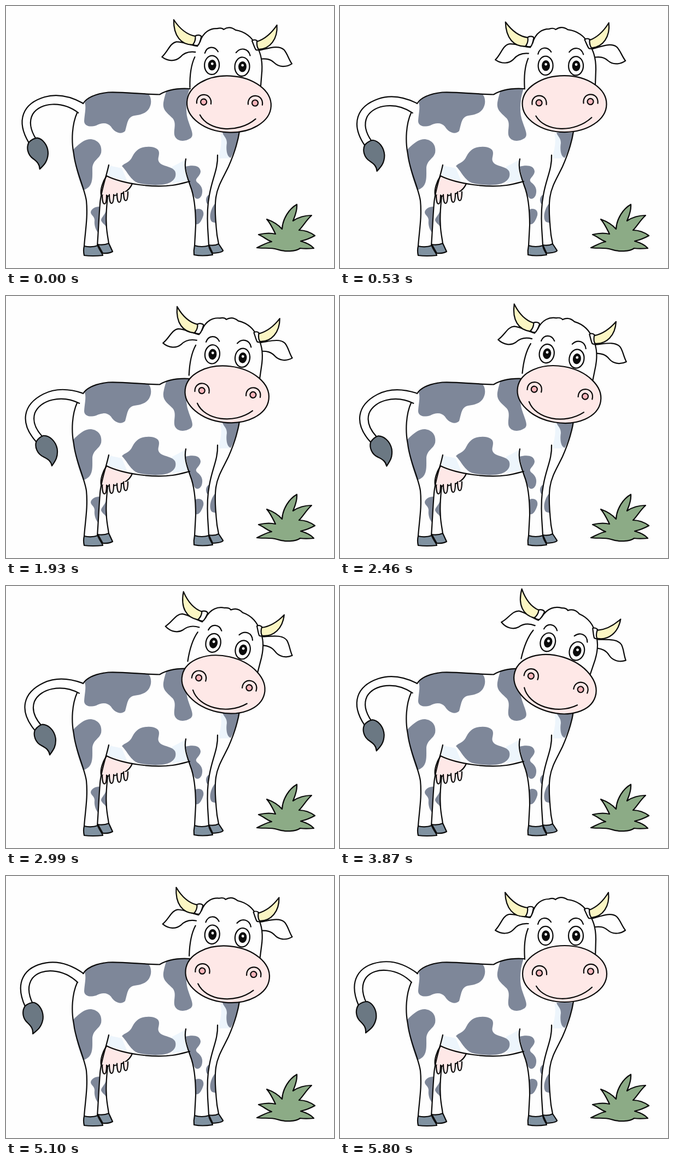
Recreate the animation shown at these times as an HTML page. Size 600 px wide and 478 px high, loop 5.98 s.

```html
<!DOCTYPE html>
<html lang="en">
<head>
<meta charset="utf-8">
<title>Cow</title>
<style>
  html, body { margin: 0; width: 100%; height: 100%; overflow: hidden; background: #fefefe; }
  svg { display: block; width: 100vw; height: 100vh; }
  .line { fill: none; stroke: #0b0b0b; stroke-width: 2.2; stroke-linecap: round; stroke-linejoin: round; }
  .bare { stroke: none; }
  .white { fill: #fefefe; }
  .patch { fill: #7e8799; }
  .shade { fill: #edf5fc; }
  .grey { fill: #6b7883; }
  .hoof { fill: #8092a1; }
  .pink { fill: #fee8e7; }
  .horn { fill: #fbf6c3; }
  .nose { fill: #f9b4ba; }
  .grass { fill: #8cab86; }
  .ink { fill: #0b0b0b; }
</style>
</head>
<body>
<svg viewBox="0 0 600 478">
  <path class="line grass" d="M459 441C470 436 478 431 486 430C477 427 470 420 462 417C474 414 485 414 493 416C488 406 484 397 477 389C488 393 499 400 505 407C506 388 518 370 532 362C533 375 528 384 525 392C537 384 548 382 559 382C549 391 544 401 536 409C546 409 557 413 565 419C556 424 548 427 539 429C550 432 558 436 563 442C552 443 545 443 538 442C530 448 510 449 496 444C483 440 470 443 459 441Z"/>

  <g id="tail" class="line">
    <path d="M142 178C118 160 95 154 74 157C33 163 15 192 34 236"/>
    <path d="M131 194C105 168 65 165 48 185C37 200 42 218 48 231"/>
    <path class="grey" d="M34 235C39 231 45 229 50 229C60 232 68 245 66 260C63 275 55 280 47 286C48 277 44 272 38 266C28 257 28 243 34 235Z"/>
  </g>

  <g class="shade">
    <path d="M188 291L212 296L222 320L185 310Z"/>
    <path d="M329 280C320 285 310 290 303 294L311 308L304 323L335 319Z"/>
    <path d="M392 232C397 252 390 264 389 278L408 278L406 236Z"/>
  </g>

  <g class="patch">
    <path d="M144 176C152 165 168 160 187 157.500C210 156 240 159 260 160C264 164 266 170 265 178C262 194 250 198 235 200C222 202 222 215 218 228C210 236 198 230 192 220C185 212 175 213 165 218C152 222 143 218 143 210C144 195 147 185 144 176Z"/>
    <path d="M293 156C305 150 320 149 336 151C330 165 328 190 332 205C338 225 345 235 338 241C328 248 314 248 309 238C305 228 313 215 305 205C295 195 286 190 288 176C290 165 292 160 293 156Z"/>
    <path d="M123 262C135 250 145 242 156 243C170 245 176 255 174 268C170 280 160 280 158 295C158 315 160 330 141 336C133 315 125 290 123 262Z"/>
    <path d="M212 292C217 286 226 286 231 275C238 261 248 257 258 257C270 256 280 260 280 268C280 276 276 280 281 286C287 293 303 292 309 301C313 310 308 318 300 322C290 328 262 328 242 323C228 318 222 302 212 292Z"/>
    <path d="M329 293C340 290 355 290 356 302C355 312 343 315 350 322C358 328 361 335 358 345C355 352 348 355 344 347C340 335 333 320 329 293Z"/>
    <path d="M347 371C355 368 363 372 361 382C358 392 353 400 347 398Z"/>
    <path d="M372 344C366 346 364 355 368 361L370 361Z"/>
    <path d="M383 360C374 369 370 388 377 394L384 396Z"/>
    <path d="M396 231L427 231C422 252 416 270 411 277C404 275 402 262 404 250C404 240 398 238 396 231Z"/>
    <path d="M171 366C163 366 156 370 155 376C155 382 162 383 162 391C161 400 164 408 168 413Z"/>
    <path d="M183 374C180 382 174 386 174 391C176 397 181 398 185 405Z"/>
  </g>

  <g class="line">
    <path class="pink" d="M184 310C177 320 172 335 174 345C192 349 222 346 231 324"/>
    <path id="teat" class="pink" d="M176 345C176 352 177 361 180 361C183 361 184 353 184 345"/>
    <use href="#teat" x="13" y="-1"/>
    <use href="#teat" x="27" y="-3"/>
    <use href="#teat" x="39" y="-6"/>
    <path d="M141 178C148 167 165 160 187 157.500C210 156 250 161 281 161.500C290 156 305 149 337 151"/>
    <path d="M130 195C121 215 119 245 124 270C127 300 143 330 147 355C150 385 145 410 143 438"/>
    <path d="M188 290C184 310 174 335 172 360C170 385 169 410 167 438"/>
    <path d="M186 347C184 365 182 385 184 405C185 417 187 425 188 434"/>
    <path d="M184 310C215 325 270 332 305 327C318 325 328 322 336 320"/>
    <path d="M329 279C325 296 332 313 337 328C346 350 347 380 347 400L345 437"/>
    <path d="M387 272C388 298 377 315 372 345C368 365 368 385 369 405L371 437"/>
    <path d="M427 229C423 255 415 275 407 293C398 312 387 328 384 349C381 370 384 400 386 418L389 434"/>
    <path class="hoof" d="M168 435Q178 437 188 433L195 448Q188 452 177 451Z"/>
    <path class="hoof" d="M143 438Q156 441 168 437C170 445 176 450 177 455Q158 457 143 455Q141 446 143 438Z"/>
    <path class="hoof" d="M371 436Q381 438 389 434L397 446Q396 450 378 451Z"/>
    <path class="hoof" d="M345 437Q358 441 371 437C372 445 377 450 378 454Q358 457 344 454Q343 446 345 437Z"/>
  </g>

  <g id="head" class="line">
    <path class="white" d="M349 76C335 75 322 69 309 70C297 73 295 88 284 99C296 107 309 106 317 98C324 89 334 86 345 87"/>
    <path class="white" d="M460 78C476 74 495 65 506 74C513 81 515 90 522 99C511 107 498 106 490 99C482 92 474 92 466 93"/>
    <path class="white bare" d="M338 152C336 125 338 105 344 92L352 66C357 49 370 42 382 42C388 40 392 41 394 43C402 37 410 39 416 43C434 45 447 55 453 67C463 78 468 95 468 115L467 150Z"/>
    <path d="M338 152C336 125 339 108 344 96M352 68C357 49 370 42 382 42C388 40 392 41 394 43C402 37 410 39 416 43C434 45 447 55 453 67C463 78 468 95 468 115L467 150"/>
    <path class="white" d="M342 58C346 55 352 55 354 58C353 64 352 70 349 74Q344 76 339 73Z"/>
    <path class="horn" d="M302 30C313 45 327 56 343 58C344 64 342 70 339 74C318 75 303 60 302 30Z"/>
    <path class="white" d="M457 61C453 58 449 59 447 61C450 67 452 73 455 77Q459 78 461 76Z"/>
    <path class="horn" d="M491 30C482 45 469 57 456 62C456 68 457 73 460 76C481 74 494 55 491 30Z"/>
    <path d="M362 88C365 75 379 73 386 84M419 84C427 73 441 75 445 88"/>
    <g id="eye">
      <ellipse class="white" cx="376" cy="109" rx="13.500" ry="17.200"/>
      <ellipse class="ink bare" cx="376.500" cy="109" rx="7.500" ry="9.800"/>
      <circle class="white bare" cx="376.500" cy="106.500" r="2.400"/>
    </g>
    <use href="#eye" x="55.500"/>
    <ellipse class="pink" cx="411" cy="178.500" rx="77" ry="51.500"/>
    <path d="M359 201C376 230 430 232 461 203"/>
    <g id="nostril">
      <circle class="nose" cx="364.500" cy="177" r="5.500"/>
      <path d="M352 180C349 159 380 158 378 180"/>
    </g>
    <use href="#nostril" x="94" y="-3"/>
  </g>
</svg>
<script>
  const LOOP = 5980, STEPS = 34;

  // [step, degrees]
  const headKeys = [[0, 3], [2, .7], [4, .2], [6, 1.2], [11, 6.6], [18, 14], [21, 16.8], [22, 17], [24, 14], [26, 10.7], [30, 4], [33, 0]];
  const tailKeys = [[0, -7.9], [6, -13.8], [11, -18.6], [13, -20], [17, -16.8], [22, -10.4], [26, -4.6], [30, 0], [33, 0]];

  const head = document.getElementById("head");
  const tail = document.getElementById("tail");

  function angleAt(keys, step) {
    const i = keys.findIndex(k => k[0] >= step);
    if (i === 0) return keys[0][1];
    const [s0, a0] = keys[i - 1], [s1, a1] = keys[i];
    return a0 + (a1 - a0) * (step - s0) / (s1 - s0);
  }

  function turn(el, angle, x, y) {
    el.setAttribute("transform", `rotate(${angle.toFixed(2)} ${x} ${y})`);
  }

  const start = performance.now();

  function draw() {
    const time = (performance.now() - start) % LOOP;
    // steps begin on rounded times, up to 5 ms early
    const step = Math.min(STEPS - 1, Math.floor((time + 5) / LOOP * STEPS));
    turn(head, angleAt(headKeys, step), 400, 120);
    turn(tail, angleAt(tailKeys, step), 138, 185);
    requestAnimationFrame(draw);
  }
  draw();
</script>
</body>
</html>
```
